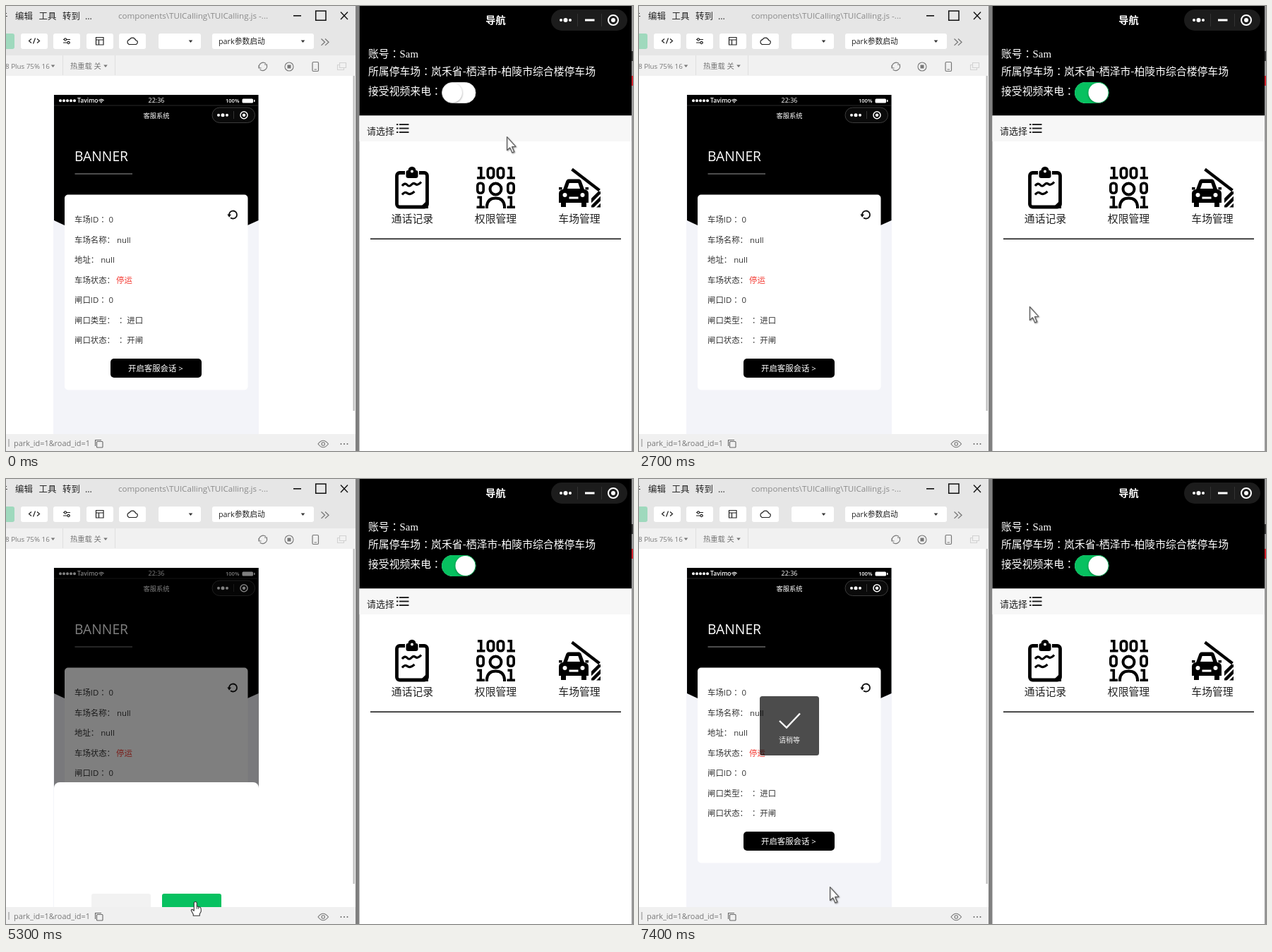
An HTML page with a canvas for the animation above (8000 ms loop, 888 px wide and 631 px high).

```html
<!DOCTYPE html>
<html lang="zh-CN">
<head>
<meta charset="utf-8">
<title>客服系统</title>
<style>
html, body { margin: 0; width: 100%; height: 100%; overflow: hidden; background: #fff; }
canvas { display: block; width: 888px; height: 631px; }
</style>
</head>
<body>
<canvas id="stage" width="888" height="631"></canvas>
<script>
const g = document.getElementById('stage').getContext('2d');
const LOOP = 8000, STEP = 100;
const CJK = '"Noto Sans CJK SC", "Noto Sans CJK", sans-serif';
const SANS = '"Open Sans", ' + CJK;
// The TC face centres the full-width colon in its cell.
const CENTRED = '"Noto Sans CJK TC", ' + CJK;
const GREEN = '#07c160';

// ---- helpers ----
function text(s, x, cy, size, color, align = 'left', family = SANS, weight = 400) {
  g.font = `${weight} ${size}px ${family}`;
  g.textAlign = align;
  g.fillStyle = color;
  g.fillText(s, x, cy + size * 0.37);
}
function rect(x, y, w, h, color) {
  g.fillStyle = color;
  g.fillRect(x, y, w, h);
}
function box(x, y, w, h, r, fill, stroke, lw = 1) {
  g.beginPath();
  g.roundRect(x, y, w, h, r);
  paint(fill, stroke, lw);
}
function disc(x, y, r, fill, stroke, lw = 1) {
  g.beginPath();
  g.arc(x, y, r, 0, Math.PI * 2);
  paint(fill, stroke, lw);
}
function poly(points, fill, stroke, lw = 1, closed = !!fill) {
  g.beginPath();
  for (let i = 0; i < points.length; i += 2) g.lineTo(points[i], points[i + 1]);
  if (closed) g.closePath();
  paint(fill, stroke, lw);
}
function path(d, fill, stroke, lw = 1) {
  const p = new Path2D(d);
  if (fill) { g.fillStyle = fill; g.fill(p); }
  if (stroke) { g.strokeStyle = stroke; g.lineWidth = lw; g.stroke(p); }
}
function paint(fill, stroke, lw) {
  if (fill) { g.fillStyle = fill; g.fill(); }
  if (stroke) { g.strokeStyle = stroke; g.lineWidth = lw; g.stroke(); }
}
function caret(x, y, color = '#333') {
  poly([x - 2.8, y - 1.5, x + 2.8, y - 1.5, x, y + 2], color);
}
function dots(x, y, gap, r, mid, color) {
  [-1, 0, 1].forEach(i => disc(x + i * gap, y, i ? r : mid, color));
}
const clamp = v => Math.max(0, Math.min(1, v));
const smooth = v => v * v * (3 - 2 * v);

// ---- left window ----
function drawTools() {
  rect(0, 0, 495, 631, '#fff');
  rect(0, 0, 495, 70, '#e6e6e6');
  rect(0, 70, 495, 29, '#f1f1f1');
  text('牛', -10, 14, 12.4, '#222');
  [['编辑', 13], ['工具', 46.5], ['转到', 80], ['...', 112]].forEach(([s, x]) => text(s, x, 14, 12.4, '#222'));
  text('components\\TUICalling\\TUICalling.js -...', 159, 14, 11.6, '#8a8a8a');
  rect(407, 13, 11, 1.6, '#111');
  box(438.7, 7, 14.3, 13.3, 0, null, '#111', 1.5);
  poly([474, 8.5, 484, 19], null, '#111', 1.4);
  poly([484, 8.5, 474, 19], null, '#111', 1.4);

  box(-8, 39, 20, 22, 3, '#9fd9bd');
  [21, 67, 114, 160].forEach(x => box(x, 39, 38, 22, 3, '#fff'));
  box(216, 39, 60, 22, 3, '#fff');
  box(292, 39, 144, 22, 3, '#fff');
  path('M36 46.5l-3.5 3 3.5 3M44 46.5l3.5 3-3.5 3M41.5 45.5l-3 8', null, '#222', 1.2);
  path('M81 47.5h10M81 52h10', null, '#222', 1.1);
  disc(84, 47.5, 1.6, '#fff', '#222', 1.1);
  disc(88.5, 52, 1.6, '#fff', '#222', 1.1);
  path('M127.5 44.5h10.5v10.5h-10.5zM127.5 48h10.5M131.5 48v7', null, '#222', 1.2);
  path('M176 54.5h7a3 3 0 0 0 .5-6a4.6 4.6 0 0 0-8.6-.8a3.4 3.4 0 0 0 1.1 6.8z', null, '#222', 1.2);
  caret(261.5, 50);
  text('park参数启动', 301, 50.5, 10.8, '#222');
  caret(420.5, 50);
  path('M446.5 46.5l5 4.7-5 4.7M452 46.5l5 4.7-5 4.7', null, '#777', 1.3);

  text('8 Plus 75% 16', -1, 85, 9.8, '#777');
  caret(66.5, 85, '#777');
  text('热重载 关', 91, 85, 10.3, '#777');
  caret(141, 85, '#777');
  rect(80, 70, 1, 28, '#e0e0e0');
  rect(154, 70, 1, 28, '#e0e0e0');
  path('M358.6 88a6 6 0 0 1 9.4-6.5M369 83a6 6 0 0 1-9.4 7M358 84v4h3.5M369.5 87v-4h-3.5', null, '#777', 1.1);
  disc(401, 86, 6, null, '#777', 1.1);
  rect(398.5, 83.5, 5, 5, '#777');
  box(434, 79.5, 8.5, 13, 1.5, null, '#777', 1.2);
  rect(436.5, 89.5, 3.5, 1, '#777');
  path('M472.5 80.5h9v7h-9zM472 83.5h-2.5v7h9v-2.5', null, '#d2d2d2', 1.1);

  rect(491.5, 99, 2.5, 475, '#c2c2c2');
  rect(0, 607, 495, 24, '#f0f0f0');
  rect(3.5, 614, 1, 11, '#888');
  text('park_id=1&road_id=1', 11, 620, 10.9, '#777');
  box(128.5, 617.5, 8.5, 8.5, 1, null, '#666', 1.1);
  path('M126.5 624v-8.5h8.5', null, '#666', 1.1);
  path('M442 621q7-9.5 14.5 0q-7.5 9.5-14.5 0z', null, '#777', 1.1);
  disc(449.2, 621, 2.2, null, '#777', 1.1);
  dots(479, 621, 4.5, 1, 1, '#666');
}

function drawPhone(pressed) {
  rect(67, 126, 291, 481, '#f3f4f9');
  poly([68, 126, 357.5, 126, 357.5, 304, 342, 311, 213, 366, 83, 311, 68, 304], '#000');
  rect(68, 140.5, 289, 1, '#2b2b2b');
  for (let i = 0; i < 5; i++) disc(77 + i * 5, 134.3, 2, '#fff');
  text('Tavimo', 101, 134, 8.6, '#fff', 'left', SANS, 600);
  [4.6, 2.6].forEach(r => {
    g.beginPath();
    g.arc(134.8, 137, r, -Math.PI * 0.8, -Math.PI * 0.2);
    paint(null, '#fff', 1.1);
  });
  disc(134.8, 136.6, 0.9, '#fff');
  text('22:36', 213, 134, 9, '#fff', 'center');
  text('100%', 330.5, 134.5, 7.6, '#fff', 'right', SANS, 600);
  box(334.5, 131.5, 15.5, 6, 1.5, '#fff');
  rect(351, 133, 1.5, 3, '#fff');
  text('客服系统', 213, 156, 9.3, '#fff', 'center', CJK, 500);
  box(292, 144, 60.5, 21.5, 10.7, '#0a0a0a', '#3c3c3c');
  dots(307, 154.7, 6, 2, 2.5, '#fff');
  rect(322, 149, 1, 11, '#333');
  disc(337, 154.7, 5, null, '#fff', 1.5);
  disc(337, 154.7, 2.3, '#fff');

  text('BANNER', 97, 213, 19.3, '#fff');
  rect(97.5, 237.5, 81.5, 1, '#999');

  box(83, 267.5, 259.5, 277, 5, '#fff');
  ['车场ID： 0', '车场名称： null', '地址： null', '车场状态： ', '闸口ID： 0', '闸口类型： ： 进口', '闸口状态： ： 开闸']
    .forEach((s, i) => text(s, 97, 303 + i * 28.5, 11.4, '#333', 'left', '"Open Sans", ' + CENTRED));
  text('停运', 156, 388.5, 11.4, '#f43a32');
  g.beginPath();
  g.arc(321.5, 296, 5.5, -Math.PI * 1.05, Math.PI * 0.72);
  paint(null, '#111', 1.8);
  poly([313.3, 295.5, 319, 295.5, 316.2, 299.8], '#111');

  box(148, 500, 129, 27, 5, pressed ? '#dedede' : '#000');
  text('开启客服会话 >', 173, 513.7, 11.4, pressed ? 'rgba(0,0,0,.6)' : '#fff', 'left', SANS, 500);
}

function drawSheet() {
  g.save();
  g.beginPath();
  g.rect(68, 126, 290, 481);
  g.clip();
  rect(68, 126, 290, 481, 'rgba(0,0,0,.5)');
  box(68, 430, 290, 200, 8, '#fff');
  box(121, 588, 84, 28, 3, '#f2f2f2');
  box(221, 588, 84, 28, 3, GREEN);
  g.restore();
}

function drawToast(alpha) {
  g.globalAlpha = alpha;
  box(171, 308, 84, 84, 3.5, 'rgba(0,0,0,.7)');
  poly([199, 343, 209, 352.5, 228, 332.5], null, '#fff', 2.4);
  text('请稍等', 213, 370, 10, '#eee', 'center');
  g.globalAlpha = 1;
}

// ---- right window ----
function label(s, x, cy) {
  const size = 14.85;
  text(s, x, cy, size, '#fff', 'left', CJK);
  const end = x + s.length * size;
  text('：', end, cy, size, '#fff', 'left', CENTRED);
  return end + size;
}
function zero(x, y) { box(x + 1.8, y + 1.8, 8.4, 13.9, 3.6, null, '#000', 3.6); }
function one(x, y) { path(`M${x + 1} ${y + 1.8}h4.8v14M${x} ${y + 15.7}h11.5`, null, '#000', 3.6); }

function drawClipboard() {
  box(553.5, 236.5, 43, 48.5, 4, null, '#000', 4.8);
  box(565, 232, 20, 13, 3, '#fff');
  box(566.5, 233, 17, 11, 3, '#000');
  disc(575, 233.2, 5.5, '#000');
  disc(575, 234.5, 2, '#fff');
  path('M561 255q4-5 7-1.5t6 0t6-1t8-3M561 267.5q4-5 7.5-2t10-2.5', null, '#000', 3.2);
  poly([598, 274, 598, 287, 585, 287], '#000');
}

function drawPeople() {
  one(667, 228);
  zero(680.5, 228);
  zero(694.5, 228);
  one(709.5, 228);
  zero(666, 249.5);
  zero(709, 249.5);
  one(666.5, 269.5);
  one(709.5, 269.5);
  disc(693.5, 259.5, 8, '#fff', '#000', 4);
  path('M681 287v-3q1-11.5 12.5-11.5t12.5 11.5v3', '#fff', '#000', 4);
}

function drawCar() {
  poly([801.5, 231.5, 840.5, 261.5], null, '#000', 4.3);
  path('M789 260l4-11q1-3.5 4-3.5h14q3 0 4 3.5l4 11q6 1 6 6v13h-3v6h-7v-6h-22v6h-7v-6h-3v-13q0-5 6-6z', '#000');
  path('M795 259l2.7-8h12.6l2.7 8z', '#fff');
  disc(791.5, 268, 3, '#fff');
  disc(816.5, 268, 3, '#fff');
  rect(797.5, 270.5, 13, 3, '#fff');
  rect(783, 257, 4.5, 3.5, '#000');
  rect(820.5, 257, 4.5, 3.5, '#000');
  g.save();
  g.beginPath();
  g.rect(829, 263, 13, 22.5);
  g.clip();
  for (let i = 0; i < 4; i++) poly([826, 279 + i * 10, 846, 259 + i * 10], null, '#000', 4.5);
  g.restore();
}

function drawToggle(on) {
  const k = smooth(on);
  box(617.5, 108.5, 47.5, 29, 14.5, '#fff', '#dfdfdf');
  g.globalAlpha = k;
  box(617, 108, 48.5, 30, 15, GREEN);
  g.globalAlpha = 1;
  g.save();
  g.shadowColor = 'rgba(0,0,0,.4)';
  g.shadowBlur = 3;
  g.shadowOffsetY = 1;
  disc(632 + 18.5 * k, 123, 14, '#fff');
  g.restore();
}

function drawManager(on) {
  rect(495, 0, 6, 631, '#808080');
  rect(500.5, 0, 388, 631, '#fff');
  rect(500.5, 0, 385.5, 155.5, '#000');
  rect(500.5, 155.5, 385.5, 36.5, '#f7f7f7');
  rect(886, 0, 2, 631, '#999');
  rect(886, 64, 2, 14, '#333');
  rect(886, 99, 2, 14, '#d0202a');

  text('导航', 693.5, 20, 14.2, '#fff', 'center', CJK, 600);
  box(772, 5, 108, 30, 15, '#1c1c1c');
  dots(792.5, 20, 6.5, 2, 3, '#fff');
  rect(809, 11, 1, 18, '#333');
  rect(843, 11, 1, 18, '#333');
  rect(820, 18.5, 13.5, 3, '#fff');
  disc(860, 20, 7, null, '#fff', 2);
  disc(860, 20, 3, '#fff');

  text('Sam', label('账号', 513, 68), 68, 14.85, '#fff', 'left', '"Liberation Serif", serif');
  text('岚禾省-栖泽市-柏陵市综合楼停车场', label('所属停车场', 513, 93), 93, 14.85, '#fff', 'left', CJK);
  label('接受视频来电', 513, 121);
  drawToggle(on);

  text('请选择', 511, 177, 13, '#222', 'left', CJK, 300);
  [168, 173.5, 179].forEach(y => {
    rect(553, y - 0.9, 2.5, 1.8, '#111');
    rect(557, y - 0.9, 13.5, 1.8, '#111');
  });
  drawClipboard();
  drawPeople();
  drawCar();
  [['通话记录', 575.5], ['权限管理', 693.5], ['车场管理', 812]]
    .forEach(([s, x]) => text(s, x, 302, 14.85, '#222', 'center', CJK, 300));
  rect(516, 329.5, 355, 1.5, '#111');
}

function drawModal(pressed) {
  box(544, 207, 298, 218, 2, '#fafafa');
  text('准备', 555, 223, 13, '#222', 'left', CJK);
  path('M825.5 216l7 7M832.5 216l-7 7', null, '#666', 1.2);
  text('开始接受用户来电？', 634, 294, 13, '#111', 'left', CENTRED);
  box(574, 366, 112, 29, 3.5, pressed ? '#06ae56' : GREEN);
  text('确定', 629, 380, 13, '#fff', 'center', CJK);
  box(700, 366, 112, 29, 3.5, '#f2f2f2');
  text('取消', 756, 380, 13, '#06ae56', 'center', CJK);
}

// ---- pointer ----
const TRACK = [
  [0, 709, 185], [200, 711, 202], [700, 656, 130], [1000, 656, 130],
  [1800, 664, 371], [1900, 662, 381], [2000, 662, 381], [2400, 566, 422],
  [2600, 566, 422], [3400, 260, 514], [3900, 260, 514], [4300, 242, 545],
  [4700, 264, 594.5], [4900, 264, 594.5], [5000, 270, 598], [5200, 270, 598],
  [5400, 266.5, 600.5], [6000, 266.5, 600.5], [6100, 265, 599], [6400, 265, 599],
  [7000, 272, 577], [7200, 270, 578]
];
function pointerAt(t) {
  const i = TRACK.findIndex(k => k[0] > t);
  if (i < 0) return TRACK[TRACK.length - 1].slice(1);
  const [t0, x0, y0] = TRACK[i - 1], [t1, x1, y1] = TRACK[i];
  const k = smooth((t - t0) / (t1 - t0));
  return [x0 + (x1 - x0) * k, y0 + (y1 - y0) * k];
}
function drawPointer(t) {
  const [x, y] = pointerAt(t);
  const onPhone = x < 358 && t < 5000;
  const onToggle = t < 2000 && x > 617 && x < 665 && y > 108 && y < 138;
  const hand = onToggle || (t >= 5000 && t < 6100);
  if (onPhone) {
    disc(x, y, 9.5, 'rgba(20,20,20,.5)', 'rgba(120,120,120,.4)', 2);
    return;
  }
  g.save();
  g.translate(x, y);
  g.lineJoin = 'round';
  if (hand) {
    path('M-2 1.5Q0-1 2 1.5V6.5L6.5 8Q8 8.5 8 11V14L6 17.5V20H-3V18L-6 12.5Q-5.5 9.5-2 13Z', '#fff', '#333', 1.1);
    path('M2 6.5v4M4.3 7.5v3', null, '#333', 0.9);
  } else {
    g.shadowColor = 'rgba(0,0,0,.35)';
    g.shadowBlur = 2;
    g.shadowOffsetX = g.shadowOffsetY = 1;
    poly([0.5, 0.5, 0.5, 19.5, 4.6, 15.8, 7.8, 23, 10.8, 21.7, 7.6, 14.6, 13, 14.3], '#fff', '#555', 1.1);
  }
  g.restore();
}

function draw(t) {
  drawTools();
  drawPhone(t >= 3400 && t < 3600);
  if (t >= 5000 && t < 5700) drawSheet();
  if (t >= 6100) drawToast(t < 6200 ? 0.5 : 1);
  drawManager(clamp((t - 2000) / 300));
  if (t >= 1000 && t < 2100) drawModal(t >= 1900);
  drawPointer(t);
}

const start = performance.now();
function tick() {
  const t = (performance.now() - start) % LOOP;
  draw(Math.floor(t / STEP) * STEP);
  requestAnimationFrame(tick);
}
tick();
</script>
</body>
</html>
```
